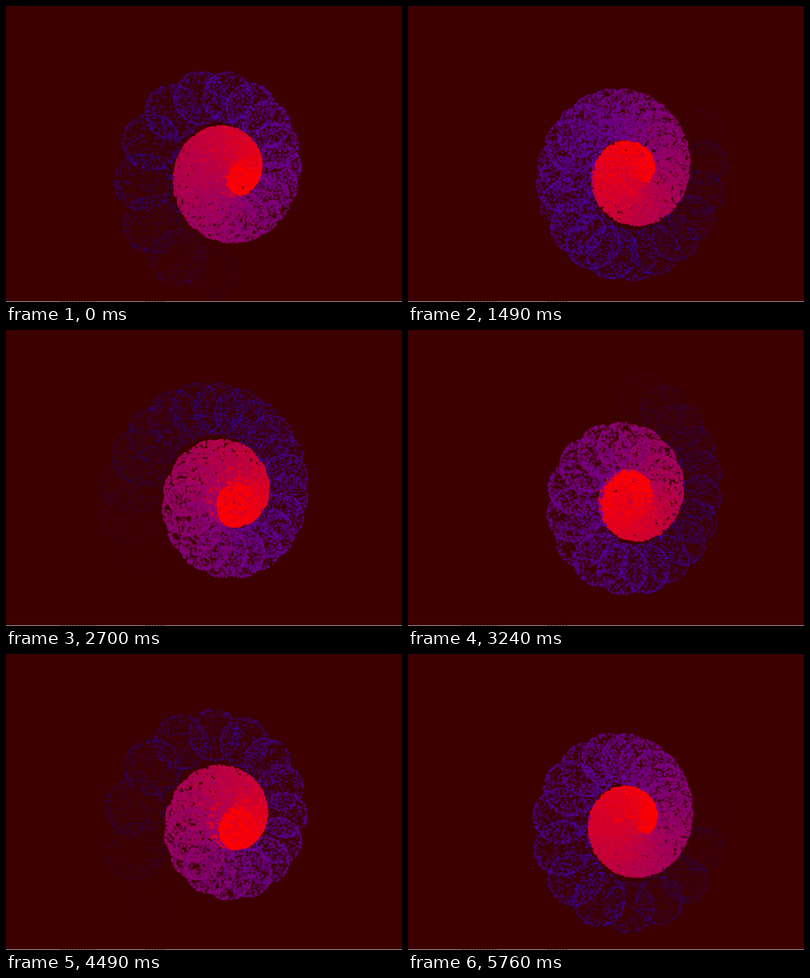
An HTML page with a canvas for the animation above (5830 ms loop, 800 by 600 pixels).

```html
<!DOCTYPE html>
<html lang="en">
<head>
<meta charset="utf-8">
<title>Particle spiral</title>
<style>
  html, body { margin: 0; width: 100%; height: 100%; overflow: hidden; background: #3c0000; }
  canvas { display: block; }
</style>
</head>
<body>
<canvas id="stage" width="800" height="600"></canvas>
<script>
const ctx = document.getElementById('stage').getContext('2d');
const TAU = Math.PI * 2;
const LOOP = 5830;
const STEP = 135;         // usual time between two pictures
const LIFE = 1.81;        // in turns of the emitter
const SPEED = 112;        // pixels per turn
const RADIUS = 50;
const DOTS = 450;
const CAMERA = 730;
const CENTER = { x: 452, y: 336 };
const TILT = 0.541;

// Emitter rotation, slightly uneven: [ms, turns].
const turns = [[0, 0], [520, .19], [1490, .675], [2190, 1.02], [3240, 1.51], [4490, 2.16], [5760, 2.745]];

// The rotation advances in equal steps between two key points.
function turnAt(ms) {
  const next = turns.findIndex(([time]) => time > ms);
  if (next < 0) return turns[turns.length - 1][1];
  const [t0, a] = turns[next - 1];
  const [t1, b] = turns[next];
  const count = Math.round((t1 - t0) / STEP);
  return a + (b - a) * Math.floor((ms - t0) / (t1 - t0) * count) / count;
}

let seed = 7;
function random() {
  seed = (seed * 1664525 + 1013904223) % 4294967296;
  return seed / 4294967296;
}

function randomDirection() {
  const z = random() * 2 - 1;
  const a = random() * TAU;
  const r = Math.sqrt(1 - z * z);
  return { x: r * Math.cos(a), y: r * Math.sin(a), z };
}

// Spheres of dots are released at a slowly varying rate.
const spheres = [];
for (let n = -50; n <= 35; n++) {
  const birth = .9 + .055 * n + .1 * Math.sin(TAU * n / 48);
  spheres.push({
    birth,
    angle: (birth + .02) * TAU,
    dots: Array.from({ length: DOTS }, randomDirection)
  });
}

function collectDots(turn) {
  const dots = [];
  for (const { birth, angle, dots: directions } of spheres) {
    const p = (turn - birth) / LIFE;
    if (p < 0 || p > 1) continue;
    const distance = (turn - birth + .06) * SPEED;
    const across = distance * Math.cos(angle);
    const cx = across * Math.cos(TILT);
    const cy = distance * Math.sin(angle);
    const cz = across * Math.sin(TILT);
    const color = `rgba(${Math.round(255 * (1 - p))},0,${Math.round(255 * p)},${(1 - p ** 1.2).toFixed(3)})`;
    for (const d of directions) {
      const z = cz + d.z * RADIUS;
      const scale = CAMERA / (CAMERA + z);
      const size = Math.round((5.8 - 3 * p) * scale);
      dots.push({
        z, size, color,
        x: Math.round(CENTER.x + (cx + d.x * RADIUS) * scale - size / 2),
        y: Math.round(CENTER.y + (cy + d.y * RADIUS) * scale - size / 2)
      });
    }
  }
  return dots.sort((a, b) => b.z - a.z);
}

function drawBottomEdge() {
  ctx.fillStyle = '#e6dede';
  ctx.fillRect(0, 599, 800, 1);
  ctx.fillStyle = '#8a7474';
  for (const [from, to] of [[110, 182], [282, 322]]) {
    for (let x = from; x < to; x += 6) ctx.fillRect(x, 599, 3, 1);
  }
}

function draw(turn) {
  ctx.fillStyle = '#3c0000';
  ctx.fillRect(0, 0, 800, 600);
  for (const { x, y, size, color } of collectDots(turn)) {
    ctx.fillStyle = color;
    ctx.fillRect(x, y, size, size);
  }
  drawBottomEdge();
}

let shown = -1;
function tick() {
  const turn = turnAt(performance.now() % LOOP);
  if (turn !== shown) {
    shown = turn;
    draw(turn);
  }
  requestAnimationFrame(tick);
}
tick();
</script>
</body>
</html>
```
